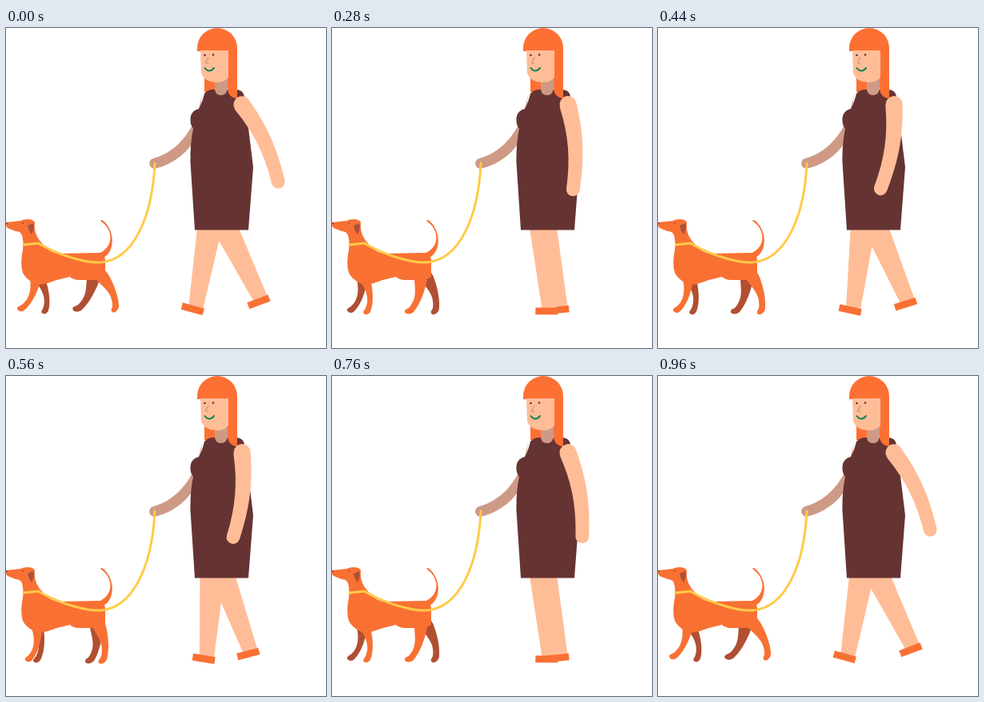
These frames come from a looping animation (400 px wide and 400 px high, 1000 ms). An HTML page:

```html
<!DOCTYPE html>
<html lang="en">
<head>
<meta charset="utf-8">
<title>Walking the dog</title>
<style>
html, body { margin: 0; width: 100%; height: 100%; overflow: hidden; background: #fff; }
svg { display: block; width: 100%; height: 100%; }
.fur { fill: #f97033; }
.hair { fill: #fd7033; }
.skin { fill: #ffbd97; }
.tan { fill: #ce9a85; }
.dark { fill: #b04f32; }
.line { fill: none; stroke-linecap: round; stroke-linejoin: round; }
</style>
</head>
<body>
<svg viewBox="0 0 400 400">
  <defs>
    <path id="fore" d="M31 312C39 326 39.5 340 34 348C32 352 28 353 29 356Q32 360 37 356.5C43.5 348 47 332 46 312Z"/>
    <path id="hind" d="M103 303C107 318 114.5 330 114 340C113 350 111 353 108 355Q106 358 109 360Q114 361 118 356C122 347 124.5 332 123 314L120 300Z"/>
    <g id="leg">
      <path class="skin" d="M-15.5 20L2 130.5H20.500L16.500 20Z"/>
      <path class="fur" d="M-6 130h28v8.700h-28Z"/>
    </g>
  </defs>

  <!-- dog -->
  <use id="foreFar" href="#fore" class="dark"/>
  <use id="hindFar" href="#hind" class="dark"/>
  <path class="fur" d="M112 283C135 277 136 253 118 241Q119 239.500 121 240.500C136 252 138 280 120 288Z"/>
  <path class="fur" d="M0 243L18 241Q22 239 27 239Q34 239 36 243C35 256 39 262 44 268Q53 280 64 282L116 281Q124 282 124 291V311Q119 315 105 315H90Q83 314 80 311Q65 314 52 319Q42 322 35 319Q25 314 21 306Q18 297 20 283Q23 270 20 259Q18 254 12 254L2 250Q-1 247 0 243Z"/>
  <path fill="#a8513a" d="M27 247L34 244Q36 251 32 258Q28 253 27 247Z"/>
  <circle cx="21" cy="244" r="1.100" fill="#a8513a"/>
  <circle cx="1" cy="244" r="1.200" fill="#a8513a"/>
  <use id="foreNear" href="#fore" class="fur"/>
  <use id="hindNear" href="#hind" class="fur"/>

  <!-- woman -->
  <path class="tan" d="M245 82C239 125 215 155 184 163A6 6 0 0 0 187 175.500C208 171 230 155 240 132Z"/>
  <use id="legFar" href="#leg"/>
  <use id="legNear" href="#leg"/>
  <path class="hair" d="M248 55h14v25h-14Z"/>
  <path fill="#633" d="M248 82Q251 78 257 77H289Q297 78 298 86L303 125L309 174L303 252.500H236L230.500 168Q230 145 234 126Q229 119 231 110Q233 103 241 101Q245 94 248 82Z"/>
  <path class="tan" d="M261 60H277V75Q276 84 269 84Q261 84 261 75Z"/>
  <path class="hair" d="M239 29V25A25 25 0 0 1 289 25V88Q277 87 277 74V29Z"/>
  <path class="skin" d="M243 28H278V62Q273 68 263 68Q249 68 244 57Z"/>
  <circle cx="248.500" cy="34" r="1.300" fill="#633"/>
  <circle cx="259" cy="33.500" r="1.300" fill="#633"/>
  <g class="line">
    <path stroke="#ce9a85" stroke-width="1.500" d="M253 37L249.500 43.500L252.500 44.500"/>
    <path stroke="#0f8452" stroke-width="2" d="M248.500 50Q254 57 260 50"/>
  </g>
  <path id="arm" class="skin" d="M284.700 97A10.500 10.500 0 0 1 305.500 94C311 118 318 150 309.600 203A8.300 8.300 0 0 1 293 201C298 165 296 135 285 100Z"/>

  <!-- collar and leash -->
  <g class="line" stroke="#ffcb47" stroke-width="3">
    <path d="M22 271L41 269"/>
    <path d="M41 269.500C70 286 102 294 118 293C160 290 183 235 186 169"/>
  </g>
</svg>
<script>
const STEP = 40, LOOP = 1000, STRIDE = 960;
const el = id => document.getElementById(id);

// Triangle wave from 0 up to 1 and back
const swing = (t, period) => 1 - Math.abs(1 - 2 * (t % period) / period);

const turn = (id, angle, x, y) =>
  el(id).setAttribute("transform", `rotate(${angle} ${x} ${y})`);
const stride = (id, angle) =>
  el(id).setAttribute("transform", `translate(261 219.5) rotate(${angle})`);

function draw(now) {
  const t = Math.floor(now % LOOP / STEP) * STEP;
  const walk = swing(t, STRIDE);
  const trot = 1 - 2 * swing(t, STRIDE / 2);

  turn("arm", -21.8 + 37.4 * walk, 295.5, 96);
  stride("legFar", 15.3 - 36 * walk);
  stride("legNear", -20.7 + 36 * walk);

  turn("foreNear", 18 * trot, 38, 306);
  turn("foreFar", -18 * trot, 38, 306);
  turn("hindNear", -25 * trot, 112, 300);
  turn("hindFar", 25 * trot, 112, 300);
}

const start = performance.now();
function tick() {
  draw(performance.now() - start);
  requestAnimationFrame(tick);
}
tick();
</script>
</body>
</html>
```
